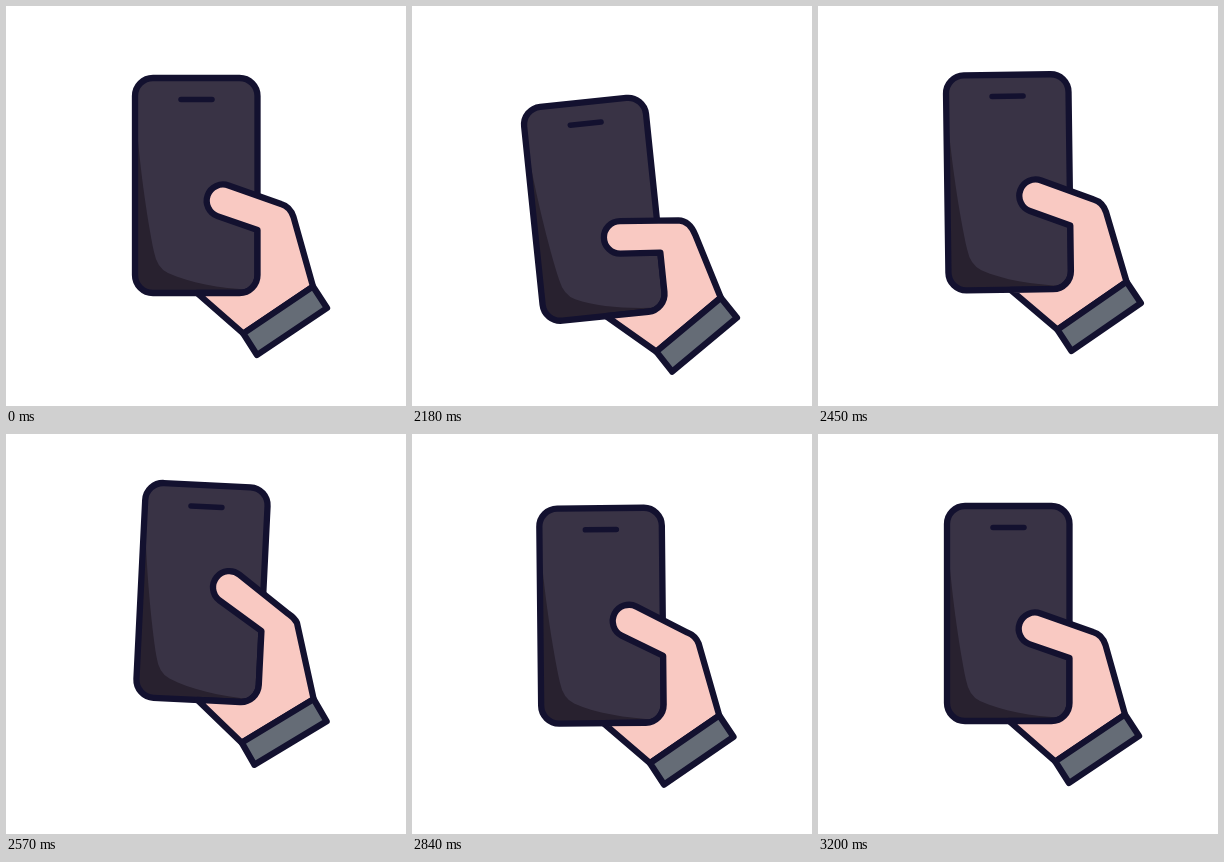
Write an HTML page that moves like this. It is 400 px wide and 400 px high and loops after 3260 ms.

```html
<!DOCTYPE html>
<html lang="en">
<head>
<meta charset="utf-8">
<title>Phone in hand</title>
<style>
  html, body { margin: 0; width: 100%; height: 100%; overflow: hidden; background: #fff; }
  svg { display: block; width: 100vw; height: 100vh; }
  .line { stroke: #13112f; stroke-width: 6.3; stroke-linejoin: round; stroke-linecap: round; }
</style>
</head>
<body>
<svg viewBox="0 0 400 400">
  <g id="rig">
    <rect x="129" y="72" width="122.5" height="215" rx="18" fill="#393345"/>
    <path fill="#28212f" d="M129 98C133 158 141 212 148 246Q151 262 162 267C184 277 212 282 246 284L234 287H147Q129 287 129 269Z"/>
    <rect class="line" x="129" y="72" width="122.5" height="215" rx="18" fill="none"/>
    <path class="line" style="stroke-width:5.5" d="M175 93.5H206"/>
    <path class="line" id="hand" fill="#f9c9c2"/>
    <path class="line" fill="#656c76" d="M237.3 327.5L307 280.5L321 302L251 349Z"/>
  </g>
</svg>
<script>
const LOOP = 3260, START = 2000, STEP = 30, LAST = 40;
const rig = document.getElementById('rig');
const hand = document.getElementById('hand');

const ease = x => x * x * (3 - 2 * x);

// Eases through [step, value] points.
function glide(k, points) {
  const i = points.findIndex(p => p[0] > k);
  if (i < 0) return points[points.length - 1][1];
  const [[k0, a], [k1, b]] = [points[i - 1], points[i]];
  return a + (b - a) * ease((k - k0) / (k1 - k0));
}

// bend: -1 thumb lowered, 0 at rest, 1 raised
function handPath(bend) {
  const sq = bend * bend, r = 16.3;
  const x = 217 + 3 * bend - 3 * sq;
  const y = 194.8 - 22.2 * bend - 2 * sq;
  const angle = (20 + 19 * bend - 1.5 * sq) * Math.PI / 180;
  const ox = r * Math.sin(angle), oy = r * Math.cos(angle);
  return `M251.5 ${224 - 8.5 * bend - 1.5 * sq}` +
    `L${x - ox} ${y + oy}A${r} ${r} 0 0 1 ${x + ox} ${y - oy}` +
    `L${275 + 3 * bend} ${198 - 1.5 * bend}Q284 200.5 ${287.5 - bend} ${211 - 6.5 * bend}` +
    'L307 280.5L237.3 327.5L191 287H233.5A18 18 0 0 0 251.5 269Z';
}

function draw(now) {
  const k = Math.min(LAST, Math.max(0, Math.floor((now % LOOP - START) / STEP)));
  const drop = glide(k, [[0, 0], [8, 28], [20, -22], [30, 5], [LAST, 0]]);
  const tilt = glide(k, [[0, 0], [8, -7], [20, 3], [30, -1], [LAST, 0]]);
  const bend = glide(k, [[0, 0], [9, -1], [20.5, 1], [34, 0]]);
  rig.setAttribute('transform', `translate(${-0.2 * drop} ${drop}) rotate(${tilt} 190 211)`);
  hand.setAttribute('d', handPath(bend));
}

const t0 = performance.now();
function tick() {
  draw(performance.now() - t0);
  requestAnimationFrame(tick);
}
tick();
</script>
</body>
</html>
```
